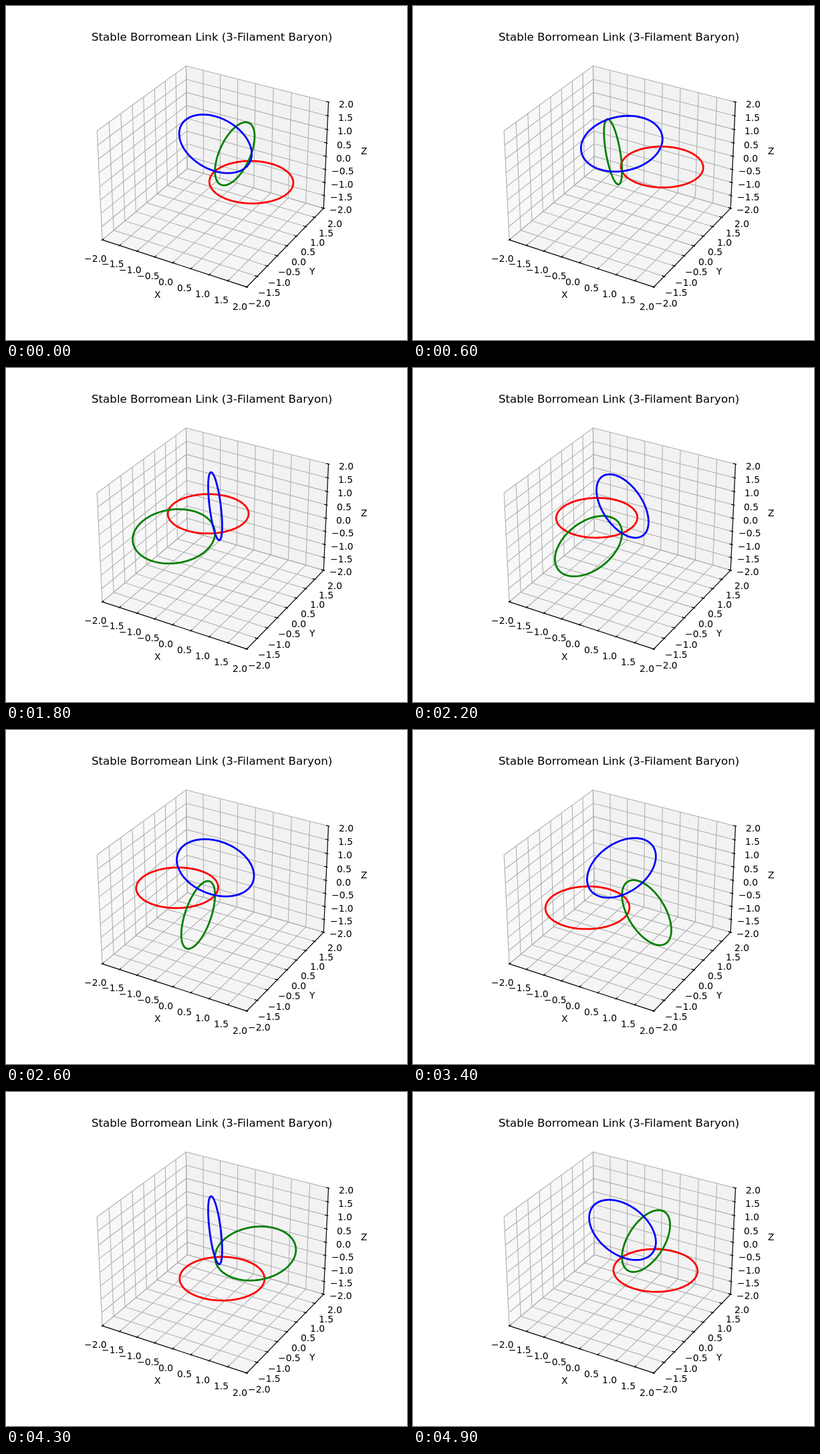
Animation of 600x500 px, one loop 5000 ms. Source, as an HTML page:

```html
<!DOCTYPE html>
<html lang="en">
<head>
<meta charset="utf-8">
<title>Stable Borromean Link</title>
<style>
  html, body { margin: 0; width: 100%; height: 100%; overflow: hidden; background: #fff; }
  svg { display: block; }
  text { font: 13.889px "DejaVu Sans", sans-serif; fill: #000; white-space: pre; }
  .title { font-size: 16.667px; }
  .pane { fill-opacity: .5; stroke-opacity: .5; stroke-width: 1.39; }
  .grid, .axis, .ring { fill: none; }
  .grid { stroke: #b0b0b0; stroke-width: 1.11; }
  .axis { stroke: #000; stroke-width: 1.11; stroke-linecap: square; }
  .tick { stroke-linecap: butt; }
  .ring { stroke-width: 2.78; stroke-linejoin: round; }
</style>
</head>
<body>
<svg id="stage" width="600" height="500" viewBox="0 0 600 500"></svg>
<script>
const NS = 'http://www.w3.org/2000/svg';
const stage = document.getElementById('stage');
const FRAMES = 50, STEP = 100, LIM = 2;

// Perspective camera: elevation 30°, azimuth -60°, distance 10
const EL = Math.PI / 6, AZ = -Math.PI / 3, DIST = 10;
const [ce, se, ca, sa] = [Math.cos(EL), Math.sin(EL), Math.cos(AZ), Math.sin(AZ)];
const UNIT = 25 / 84, UNIT_Z = 25 / 112;
const SCALE = 385 / 0.185;
const CX = 115 + 0.095 * SCALE, CY = 445 - 0.095 * SCALE;

function project([x, y, z]) {
  x *= UNIT; y *= UNIT; z *= UNIT_Z;
  const right = -sa * x + ca * y;
  const up = -se * (ca * x + sa * y) + ce * z;
  const near = ce * (ca * x + sa * y) + se * z;
  const k = SCALE / (DIST - near);
  return [CX + right * k, CY - up * k];
}

const pathOf = pts =>
  'M' + pts.map(p => project(p).map(v => v.toFixed(2)).join(' ')).join('L');

function add(tag, attrs) {
  const el = document.createElementNS(NS, tag);
  for (const key in attrs) el.setAttribute(key, attrs[key]);
  return stage.appendChild(el);
}

const line = (cls, ...pts) => add('path', { class: cls, d: pathOf(pts) });

function label(str, x, base, cls = '') {
  const el = add('text', { class: cls, y: Math.round(base) });
  el.textContent = str;
  el.setAttribute('x', Math.round(x - el.getComputedTextLength() / 2 + 0.4));
}

function pane(grey, ...pts) {
  const c = `rgb(${grey},${grey},${grey})`;
  add('path', { class: 'pane', d: pathOf(pts) + 'Z', fill: c, stroke: c });
}

const A = -LIM, B = LIM;
const ticks = Array.from({ length: 9 }, (_, i) => A + i / 2);

pane(242, [A, A, A], [A, B, A], [A, B, B], [A, A, B]);
pane(230, [A, B, A], [B, B, A], [B, B, B], [A, B, B]);
pane(236, [A, A, A], [B, A, A], [B, B, A], [A, B, A]);

for (const t of ticks) line('grid', [t, B, B], [t, B, A], [t, A, A]);
for (const t of ticks) line('grid', [A, t, B], [A, t, A], [B, t, A]);
for (const t of ticks) line('grid', [A, A, t], [A, B, t], [B, B, t]);

// Each edge gives a point for a position v, d outward along the ticks, e outward along the other side
const edges = {
  X: (v, d, e) => [v, A - d, A - e],
  Y: (v, d, e) => [B + d, v, A - e],
  Z: (v, d, e) => [B + d, B + e, v]
};
const TICK_PAD = 0.3186, NAME_PAD = 0.6926;

for (const name in edges) {
  const at = edges[name];
  line('axis', at(A, 0, 0), at(B, 0, 0));
  const [nx, ny] = project(at(0, NAME_PAD, NAME_PAD));
  label(name, nx, ny + 4);
  for (const t of ticks) {
    line('axis tick', at(t, 0.032, 0), at(t, -0.064, 0));
    const [x, y] = project(at(t, TICK_PAD, TICK_PAD));
    label(t.toFixed(1).replace('-', '\u2212'), x, y + 11);
  }
}

label('Stable Borromean Link (3-Filament Baryon)', 307.5, 51.67, 'title');

// Three unit circles touching the origin, turned together about the vertical axis
const rings = [
  ['#f00', (c, s) => [1 + c, s, 0]],
  ['#008000', (c, s) => [0, 1 + c, s]],
  ['#00f', (c, s) => [c, 0, 1 + s]]
].map(([stroke, at]) => ({ at, el: add('path', { class: 'ring', stroke }) }));

const POINTS = 120;

function draw(frame) {
  const turn = 2 * Math.PI * frame / FRAMES;
  const c = Math.cos(turn), s = Math.sin(turn);
  for (const { at, el } of rings) {
    const pts = Array.from({ length: POINTS }, (_, i) => {
      const a = 2 * Math.PI * i / POINTS;
      const [x, y, z] = at(Math.cos(a), Math.sin(a));
      return [x * c - y * s, x * s + y * c, z];
    });
    el.setAttribute('d', pathOf(pts) + 'Z');
  }
}

const start = performance.now();
let shown = -1;

function tick() {
  const frame = Math.floor((performance.now() - start) / STEP) % FRAMES;
  if (frame !== shown) draw(shown = frame);
  requestAnimationFrame(tick);
}
tick();
</script>
</body>
</html>
```
